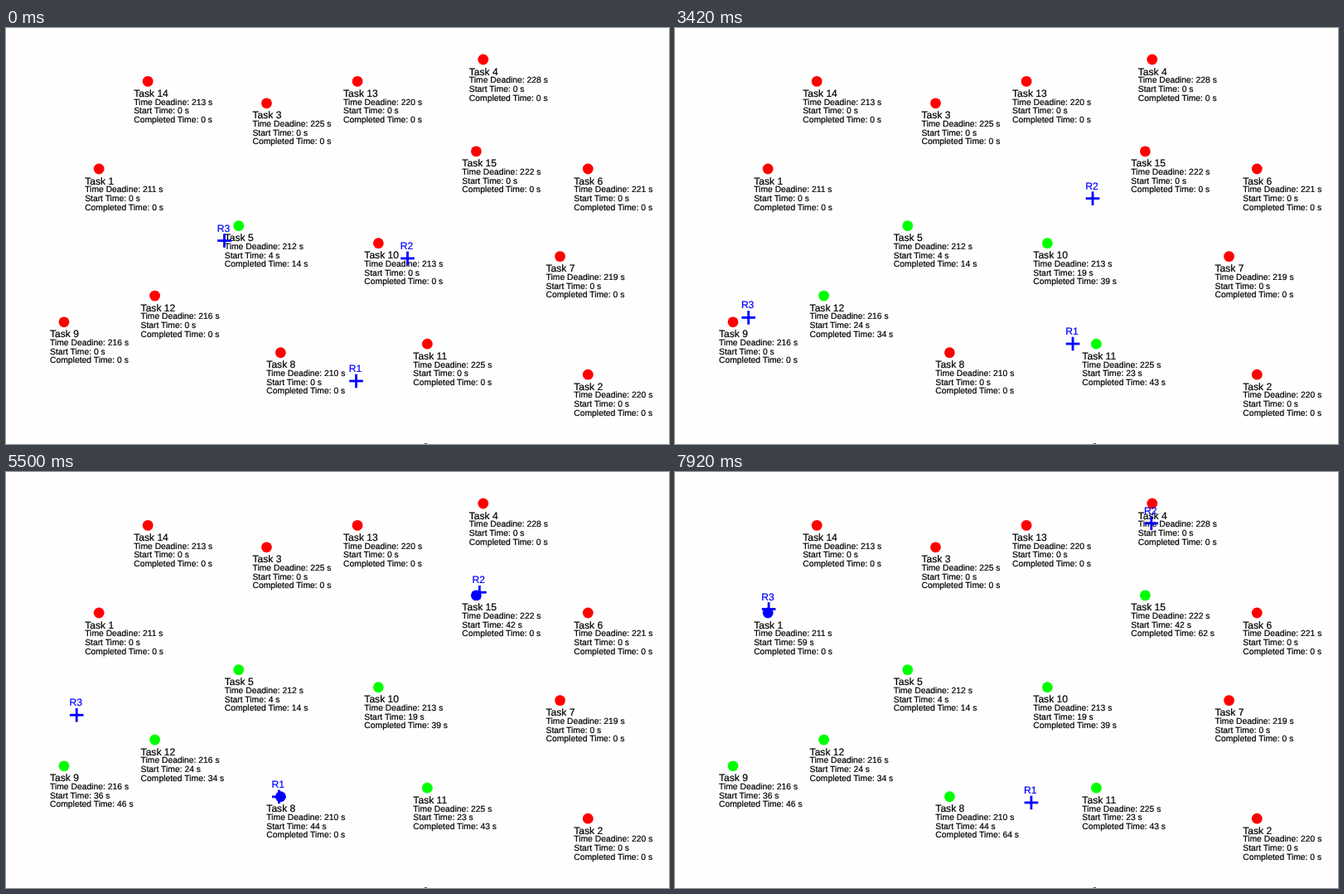
An HTML page with a canvas for the animation above (8000 ms loop, 800x502 px).

```html
<!DOCTYPE html>
<html lang="en">
<head>
<meta charset="utf-8">
<title>Task schedule</title>
<style>
html, body { margin: 0; width: 100%; height: 100%; overflow: hidden; background: #fefefe; }
canvas { display: block; }
</style>
</head>
<body>
<canvas id="stage" width="800" height="502"></canvas>
<script>
const ctx = document.getElementById('stage').getContext('2d');
const LOOP = 8000, FPS = 12;
const FONT = '"Liberation Sans", Arial, sans-serif';
const RED = '#f00', GREEN = '#0f0', BLUE = '#00f';

// Tasks sit on a regular grid: column, row, deadline
const tasks = [
  [5, 25, 211], [75, 72, 220], [29, 10, 225], [60, 0, 228], [25, 38, 212],
  [75, 25, 221], [71, 45, 219], [31, 67, 210], [0, 60, 216], [45, 42, 213],
  [52, 65, 225], [13, 54, 216], [42, 5, 220], [12, 5, 213], [59, 21, 222]
].map(([col, row, deadline]) => ({
  x: 70 + col * 8.43, y: 38 + row * 5.28, deadline,
  start: 0, end: 0, from: Infinity, to: Infinity
}));

// A leg runs straight to a task and stops `past` px beyond it; work starts on
// arrival and ends when the next leg leaves. leave and arrive count steps.
const leg = (task, leave, arrive, past, start) => ({ task: tasks[task - 1], leave, arrive, past, start });
const robots = [
  { x: 422.5, y: 426, work: 20, legs: [
    leg(11, 0, 14, 5.4, 23), leg(8, 36.8, 60.1, 2, 44), leg(2, 83, 127.5, 0, 0)] },
  { x: 484.5, y: 278, work: 20, legs: [
    leg(10, 0, 8, 4, 19), leg(15, 27.7, 56.4, 5.4, 42), leg(4, 77.6, 100, 0, 0)] },
  { x: 302, y: 170, work: 10, legs: [
    leg(5, -30, -12, 6, 4), leg(12, -3, 16.4, 1, 24),
    leg(9, 28.1, 43.4, -2, 36), leg(1, 53.6, 92, 4.6, 59)] }
];

// Spans in which the picture stands still, then catches up
const freezes = [[19, 30], [54, 56], [66, 69], [73, 75]];

function plan({ x, y, work, legs }) {
  legs.forEach((l, i) => {
    const { task } = l, next = legs[i + 1];
    const dx = task.x - x, dy = task.y - y;
    const k = 1 + l.past / Math.hypot(dx, dy);
    Object.assign(l, { x0: x, y0: y, dx: dx * k, dy: dy * k });
    x += l.dx;
    y += l.dy;
    task.from = l.arrive;
    task.start = l.start;
    task.end = l.start + work;
    if (next) task.to = next.leave;
  });
}
robots.forEach(plan);

function place(robot, step) {
  const l = robot.legs.filter(l => l.leave <= step).pop();
  const k = Math.min(1, (step - l.leave) / (l.arrive - l.leave));
  return [l.x0 + l.dx * k, l.y0 + l.dy * k];
}

function write(text, x, y, size, color) {
  ctx.font = size + 'px ' + FONT;
  ctx.textRendering = 'geometricPrecision';
  ctx.fillStyle = ctx.strokeStyle = color;
  ctx.lineWidth = 0.2;
  ctx.fillText(text, x, y);
  ctx.strokeText(text, x, y);
}

function drawTask(task, i, step) {
  const { x, y, deadline, start, end } = task;
  const begun = step >= task.from, done = step >= task.to;
  ctx.fillStyle = done ? GREEN : begun ? BLUE : RED;
  ctx.beginPath();
  ctx.arc(x, y, 6.4, 0, Math.PI * 2);
  ctx.fill();
  const left = x - 17;
  write('Task ' + (i + 1), left, y + 18.5, 12.1, '#000');
  [
    `Time Deadine: ${deadline} s`,
    `Start Time: ${begun ? start : 0} s`,
    `Completed Time: ${done ? end : 0} s`
  ].forEach((line, n) => write(line, left, y + 28.3 + n * 10.6, 10.35, '#000'));
}

function drawRobot(robot, i, step) {
  const [x, y] = place(robot, step);
  ctx.fillStyle = BLUE;
  ctx.fillRect(x - 8.3, y - 1.4, 16.6, 2.8);
  ctx.fillRect(x - 1.4, y - 8.3, 2.8, 16.6);
  write('R' + (i + 1), x - 8.8, y - 11, 12.1, BLUE);
}

function draw(now) {
  const count = Math.floor(((now % LOOP) + 5) * FPS / 1000) % (LOOP * FPS / 1000);
  const frozen = freezes.find(([a, b]) => count > a && count < b);
  const step = frozen ? frozen[0] : count;
  ctx.fillStyle = '#fefefe';
  ctx.fillRect(0, 0, 800, 502);
  ctx.fillStyle = '#555';
  ctx.fillRect(505, 501, 3, 1);
  tasks.forEach((task, i) => drawTask(task, i, step));
  robots.forEach((robot, i) => drawRobot(robot, i, step));
}

const t0 = performance.now();
function tick() {
  draw(performance.now() - t0);
  requestAnimationFrame(tick);
}
tick();
</script>
</body>
</html>
```
